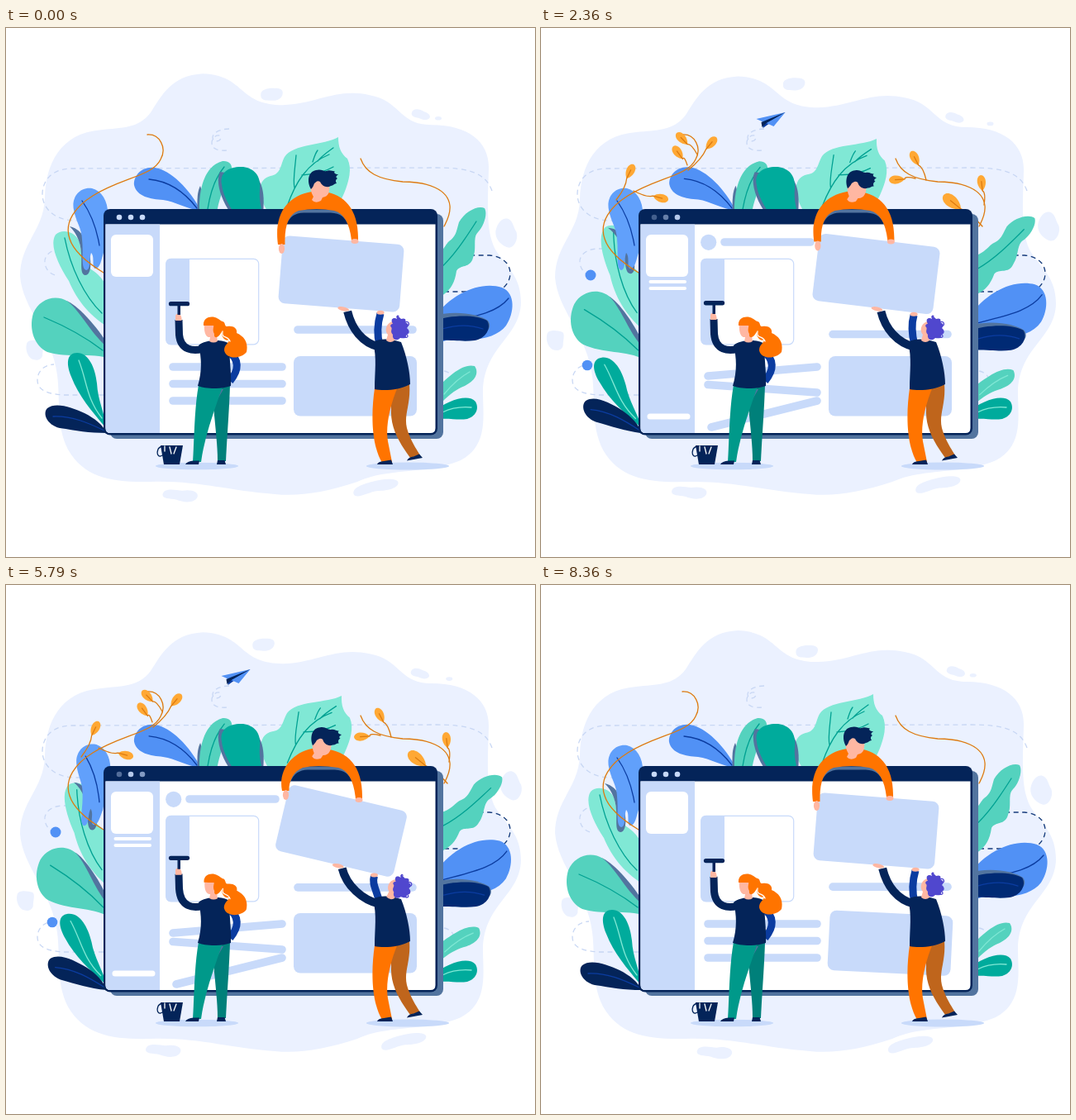
Write an HTML page that moves like this. It is 640 px wide and 640 px high and loops after 8430 ms.

```html
<!DOCTYPE html>
<html lang="en">
<head>
<meta charset="utf-8">
<title>Building a page</title>
<style>
  html, body { margin: 0; width: 100%; height: 100%; overflow: hidden; background: #fff; }
  svg { display: block; width: 100vw; height: 100vh; }
  .mist { fill: #ebf1ff; } .pale { fill: #c8dafa; } .navy { fill: #042459; } .slate { fill: #52749f; }
  .sky { fill: #5191f5; } .teal { fill: #00ab9c; } .green { fill: #54d2be; } .mint { fill: #80e8d5; }
  .orange { fill: #ff7400; } .skin { fill: #ffb7a2; } .white { fill: #fff; }
  .line { fill: none; stroke-width: 1.3; stroke-linecap: round; }
  .dash { fill: none; stroke: #c8d7f4; stroke-width: 1.3; stroke-dasharray: 6 4.5; }
  .blueVein { stroke: #0b3ca0; } .tealVein { stroke: #00a192; } .mintVein { stroke: #80e8d5; }
  .vine { stroke: #dd7b10; }
  .limb { fill: none; }
  .bar { fill: none; stroke: #c8dafa; stroke-width: 9.6; stroke-linecap: round; }
  .tag { fill: none; stroke: #fff; stroke-width: 4; stroke-linecap: round; }
</style>
</head>
<body>
<!-- data-drift: x y at the loop start, then x y half a cycle later, cycles, lag.
     data-sway: degrees, pivot x y, swings per loop. -->
<svg viewBox="0 0 640 640" preserveAspectRatio="xMidYMid meet">
  <path id="cloud" class="mist" d="M238,55C290,57 280,93 335,93C375,92 400,72 440,81C478,88 475,117 515,117C560,117 585,138 584,170C583,210 580,245 592,268C606,290 623,300 623,332C622,375 578,385 577,440C577,470 584,505 550,523C510,540 460,532 425,549C385,562 355,567 325,564C270,560 230,547 175,549C130,550 95,545 75,510C60,480 66,450 62,420C56,370 20,340 17,300C17,260 46,245 47,205C48,165 65,127 115,123C140,120 160,122 175,102C188,82 200,57 238,55Z"/>
  <g class="mist">
    <path data-drift="322 81 301 64 1 -.06" d="M-13,1C-14,-6 -4,-8 4,-7.500C12,-8 15,-4 13,1C10,8 1,8 -5,7C-10,7 -13,5 -13,1Z"/>
    <path data-drift="502 104 500 109 1 -.06" d="M-11,-2C-9,-8 -1,-6 4,-3C11,-1 13,4 9,6C3,9 -1,4 -6,4C-10,3 -12,1 -11,-2Z"/>
    <ellipse data-drift="522 109 550 118 1 -.06" rx="4" ry="2.300"/>
    <path data-drift="604 249 616 238 1 -.06" d="M-12,-3C-10,-13 -4,-19 2,-18C9,-16 9,-8 13,-2C16,7 10,18 3,17C-4,15 -13,8 -12,-3Z"/>
    <path data-drift="36 390 12 374 1 -.06" d="M-10,-8C-8,-13 2,-12 8,-10C12,-8 9,0 9,7C7,13 1,13 -4,11C-10,7 -12,-2 -10,-8Z"/>
    <path data-drift="212 566 179 562 2 .07" d="M-21,-1C-20,-10 -6,-7 3,-6C13,-8 24,-5 21,2C17,10 3,8 -4,5C-13,3 -21,4 -21,-1Z"/>
    <path data-drift="447 556 484 552 2 -.04" d="M-27,8C-29,0 -16,-4 -5,-7C8,-11 26,-12 27,-6C27,1 13,4 2,4C-9,5 -23,15 -27,8Z"/>
  </g>

  <path class="dash" d="M588,197C580,175 560,169 520,169L78,170C52,171 44,188 44,201C44,217 57,232 82,233H118"/>
  <path class="dash" d="M118,267H68C52,268 46,277 47,284C48,293 54,298 60,299"/>
  <path class="dash" d="M118,444H70C50,443 38,438 38,426C38,414 48,407 58,407"/>
  <path class="dash" d="M530,415C540,417 545,425 541,436C538,442 533,444 530,444"/>
  <path class="dash" d="M270,122C262,122 251,125 250,132C250,139 259,138 260,133C260,127 249,130 249,139C249,147 257,149 270,148"/>
  <path class="dash" style="stroke:#173d7c" d="M530,319H590C603,318 610,306 610,297C610,285 600,276 585,275H530"/>

  <circle id="dotA" class="sky" r="6.500"/>
  <circle id="dotB" class="sky" r="6.300"/>
  <circle id="dotC" class="sky" r="6.300"/>

  <g data-sway="2.6 236 220 3">
    <path class="sky" d="M236,221C222,195 200,172 180,169C163,167 154,180 155,190C158,204 175,207 190,208C205,210 218,219 236,221Z"/>
    <path class="line blueVein" d="M173,183C195,185 215,197 231,218"/>
  </g>
  <g data-sway="5 242 222 3">
    <path class="slate" d="M232,224Q230,200 235,191L245,224Z"/>
    <path class="green" d="M234,224C233,195 240,167 262,161C272,160 276,168 271,178C262,195 257,210 255,224Z"/>
    <path class="line tealVein" d="M264,168C253,181 247,200 244,219"/>
  </g>
  <g id="leafLace">
    <path class="mint" d="M318,224C303,202 304,183 320,179C333,177 332,165 337,156C347,140 385,142 402,132C402,144 405,152 413,158C419,170 415,185 409,200L398,224Z"/>
    <path class="line tealVein" d="M340,216C350,187 364,164 391,153M349,193C347,185 349,175 351,154M358,178C374,177 386,174 396,168M371,162C373,156 374,152 377,148M377,161C383,154 389,150 396,145"/>
  </g>
  <g data-sway="-1.5 288 222 3">
    <path class="slate" d="M259,174C253,185 260,208 272,224H311C313,204 311,188 303,181Z"/>
    <path class="teal" d="M261,189C258,173 272,167 287,168C300,170 309,178 307,196C306,210 309,216 310,224H276C268,212 262,200 261,189Z"/>
  </g>

  <g data-sway="10.5 119 345 2">
    <path class="mint" d="M130,366C102,350 86,330 76,306C63,286 52,262 60,250C68,242 84,246 89,259C92,279 96,288 106,294C117,302 121,310 130,330Z"/>
    <path class="line tealVein" d="M71,254C78,290 95,325 116,345"/>
  </g>
  <g id="leafAzure">
    <path data-sway="-9 90 215 2" class="slate" d="M77,240C92,243 97,258 100,270C104,283 103,299 96,299C89,298 92,285 91,272C90,258 85,248 77,240Z"/>
    <path fill="#61a0fb" d="M121,245C128,216 119,198 104,194C88,192 79,206 82,220C84,233 92,243 92,256C94,272 90,291 97,293C103,292 100,281 103,272C108,277 103,289 108,291C114,291 115,281 118,272Z"/>
    <path class="line blueVein" d="M92,209C104,226 110,245 113,263"/>
  </g>
  <g data-sway="13 119 393 1">
    <path class="slate" d="M73,330C85,334 110,360 125,386V404C105,383 85,353 73,330Z"/>
    <path class="green" d="M126,400C103,392 75,400 50,392C35,385 27,365 33,345C40,328 60,321 75,331C92,345 103,371 126,389Z"/>
    <path class="line tealVein" d="M46,350C70,360 95,373 117,390"/>
  </g>
  <g data-sway="-8.500 119 483 2">
    <path class="teal" d="M122,485C103,463 88,445 79,422C72,405 74,393 86,393C100,393 108,411 110,430C111,450 119,465 122,485Z"/>
    <path class="line mintVein" d="M88,402C98,427 97,448 116,472"/>
  </g>
  <g data-sway="8 121 489 2">
    <path class="navy" d="M122,490C100,490 85,487 65,484C49,480 44,466 50,460C60,452 80,459 95,466C107,472 117,480 122,490Z"/>
    <path class="line blueVein" d="M57,470C80,469 100,478 119,487"/>
  </g>

  <g data-sway="20 530 312 1">
    <path class="green" d="M512,335C505,305 505,283 512,280C528,274 532,261 536,258C545,252 545,245 548,235C555,222 571,214 579,218C583,225 578,240 571,247C564,254 570,266 565,278C562,291 549,286 545,294C543,308 538,316 530,322Z"/>
    <path class="line tealVein" d="M569,234C555,256 541,277 524,292"/>
  </g>
  <g data-sway="-5 525 360 1">
    <path class="sky" d="M518,350C540,320 575,306 600,314C617,321 615,345 605,360C595,373 575,378 555,376C540,374 530,378 518,384Z"/>
    <path class="line blueVein" d="M524,358C560,350 592,347 608,327"/>
  </g>
  <g id="leafInk">
    <path class="slate" d="M515,349C540,341 570,345 583,354C589,362 582,370 568,374L515,370Z"/>
    <path fill="#002a74" d="M515,355C540,346 570,347 582,354C588,363 580,376 567,378C552,380 540,377 515,378Z"/>
    <path class="line blueVein" d="M528,364C545,359 562,359 577,364"/>
  </g>
  <g data-sway="11 525 450 1">
    <path class="green" d="M515,442C535,421 553,405 567,409C573,418 567,427 555,433C545,437 538,442 528,452L515,458Z"/>
    <path class="line mintVein" d="M561,416C548,423 539,432 530,443"/>
  </g>
  <g id="leafLow">
    <path class="teal" d="M515,466C535,449 560,442 568,452C573,461 568,470 558,473C545,475 535,471 515,474Z"/>
    <path class="line mintVein" d="M528,465C540,459 552,458 563,459"/>
  </g>

  <path class="line vine" d="M171,129C186,128 195,145 187,159C178,179 140,181 105,203C84,216 70,235 77,255C82,271 100,285 118,296"/>
  <path class="line vine" d="M429,158C435,175 450,183 480,186C510,186 535,195 537,215C538,226 533,234 530,240"/>
  <g id="buds"></g>

  <rect class="slate" x="126" y="225" width="403" height="272" rx="8"/>
  <rect class="navy" x="118" y="219" width="404" height="273.500" rx="8"/>
  <path class="white" d="M120.500,237.500H519.500V484Q519.500,490 513.500,490H126.500Q120.500,490 120.500,484Z"/>
  <path class="pale" d="M120.500,237.500H186V490H126.500Q120.500,490 120.500,484Z"/>
  <g id="lights" class="pale">
    <circle cx="137" cy="229" r="3.300"/>
    <circle cx="151" cy="229" r="3.300"/>
    <circle cx="165" cy="229" r="3.300"/>
  </g>
  <rect class="white" x="127" y="250" width="51" height="51" rx="6"/>
  <path id="tagA" class="tag"/>
  <path id="tagB" class="tag"/>
  <path id="tagC" class="tag" style="stroke-width:7"/>
  <circle id="avatar" class="pale" r="9.600"/>
  <path id="title" class="bar"/>
  <rect x="193.700" y="279.300" width="112" height="103.500" rx="6" fill="#fff" stroke="#c8dafa" stroke-width="1.200"/>
  <path id="paint" class="pale"/>
  <path id="barA" class="bar"/>
  <path id="barB" class="bar"/>
  <path id="barC" class="bar"/>
  <path id="slideBar" class="bar" d="M353,365H492"/>
  <rect id="panel" class="pale" x="348" y="397" width="149" height="72.500" rx="8"/>

  <g id="plane">
    <path fill="#0b3ca0" d="M18,-9L-9,3L-9,10Z"/>
    <path class="sky" d="M18,-9L-17,-1L-8,3ZM18,-9L-5,4L4,8Z"/>
    <path class="navy" d="M18,-9L-11,3L-10,9L-5,4Z"/>
  </g>

  <g class="pale">
    <ellipse cx="231" cy="530" rx="50" ry="4.300"/>
    <ellipse cx="486" cy="530" rx="50" ry="4.500"/>
  </g>

  <path class="navy" d="M187,505H214L210,528H191Z"/>
  <path class="line" style="stroke:#042459" d="M189,506C181,508 182,519 187,518C194,515 201,511 205,506"/>
  <path class="line" style="stroke:#fff" d="M192,506V512M198,507L200,515M206,507L203,515"/>

  <path class="limb" stroke="#0b3ca0" stroke-width="9" d="M268,390C283,401 282,414 271,427"/>
  <path fill="#00807a" d="M250,434L271,432C270,465 267,500 266,524H256C256,495 250,462 250,434Z"/>
  <path class="slate" d="M252,456L256,437H263Z"/>
  <path fill="#00998a" d="M233,432L262,434C251,465 240,495 236,525H226C228,492 228,460 233,432Z"/>
  <path class="navy" d="M217,528Q219,524 227,523.500H234L233,528ZM255,528L256,523H264.500L266,528Z"/>
  <path id="painterArm" class="limb" stroke="#042459" stroke-width="9"/>
  <path class="navy" d="M233,384C241,377 262,376 270,382C270,400 273,418 272,433C258,438 240,436 232,433C237,417 237,400 233,384Z"/>
  <g id="roller">
    <path class="skin" d="M205,354V348Q206,345 209,346Q213,347 212.500,354Z"/>
    <path class="navy" d="M207.500,335H211V347H207.500ZM199.500,331H219.500A2.500,2.500 0 0 1 219.500,336.300H199.500A2.500,2.500 0 0 1 199.500,331Z"/>
  </g>
  <g id="painterHead">
    <path class="skin" d="M240,358C239,368 242,375 247,374L246,379Q251,382 256,379L255,372C261,368 260,358 257,354Z"/>
    <path class="orange" d="M239,360C238,350 249,347 257,352C261,355 262,355 262,355C266,356 264,362 268,361C276,360 280,364 279,369C290,374 293,382 291,392C284,401 266,401 264,390C264,383 270,381 270,377C265,380 260,373 261,367C257,376 251,376 252,370C249,365 252,361 251,360C247,360 242,360 239,360Z"/>
    <path class="line" stroke="#fff" d="M262,367C260,376 269,372 271,379"/>
  </g>

  <rect id="board" class="pale" x="-73.500" y="-41" width="147" height="82" rx="8"/>

  <path id="rightArm" class="limb" stroke="#0b3ca0" stroke-width="9"/>
  <path fill="#bf651c" d="M466,435L488,431C490,455 481,468 485,484C489,498 495,507 501,517L489,520C476,502 465,484 466,462Z"/>
  <path class="orange" d="M446,436L474,434C464,458 459,483 462,500L467,525L455,526C441,502 442,463 446,436Z"/>
  <path class="navy" d="M449,528Q450,524.500 457,524L466,522.500L468,528ZM485,523.500Q487,519 493,518.500L500,515.500L504,520Z"/>
  <path id="leftArm" class="limb" stroke="#042459" stroke-width="10"/>
  <path class="navy" d="M444,380C455,374 468,377 478,380C485,397 489,417 489,431C475,439 455,439 446,437C446,415 449,400 444,380Z"/>
  <ellipse id="leftHand" class="skin" rx="7" ry="2.500"/>
  <ellipse id="rightHand" class="skin" rx="4.500" ry="2.500"/>
  <g id="helperHead">
    <path class="skin" d="M467,355C459,358 458,367 462,371L460,378Q465,382 470,378L471,372L474,362Z"/>
    <path fill="#5047ce" d="M468,358C464,351 470,350 473,352C471,347 474,348 478,352C484,350 484,354 483,356C488,358 487,361 485,363C490,367 487,371 484,371C485,377 479,375 477,375C472,380 467,376 468,371C464,367 468,364 466,362C464,360 466,358 468,358Z"/>
    <path class="line" stroke="#5047ce" d="M476,353C471,349 474,347 475,349M482,356C488,354 489,359 485,361M482,370C488,371 487,376 481,374"/>
  </g>

  <path id="climberShade" fill="none" stroke="#52749f" stroke-width="4"/>
  <path id="climber" class="orange"/>
  <ellipse id="leftGrip" class="skin" rx="3.600" ry="6"/>
  <ellipse id="rightGrip" class="skin" rx="4.500" ry="3"/>
  <g id="climberHead">
    <path class="skin" d="M368,188C368,198 371,202 372,204L370,208Q374,213 381,209L383,205C391,204 392,197 391,189L379,182Z"/>
    <path class="navy" d="M369,195C364,186 365,174 375,172C382,170 384,174 388,173C392,171 396,174 398,173C396,175 398,177 402,177C400,179 398,180 401,182C398,184 399,186 400,188C397,188 396,191 393,191C388,194 382,191 380,186C376,184 375,187 373,188C372,191 371,193 369,195Z"/>
  </g>
</svg>
<script>
const LOOP = 8430;
const el = Object.fromEntries([...document.querySelectorAll('[id]')].map(n => [n.id, n]));
const numbers = text => text.split(' ').map(Number);
const collect = name => [...document.querySelectorAll(`[data-${name}]`)]
  .map(node => ({ node, args: numbers(node.dataset[name]) }));
const swaying = collect('sway'), drifting = collect('drift');

const place = (node, transform) => node.setAttribute('transform', transform);
const shift = (id, x, y, extra = '') => place(el[id], `translate(${x} ${y}) ${extra}`);
const spin = (id, deg, x, y) => place(el[id], `rotate(${deg} ${x} ${y})`);
const draw = (id, d) => el[id].setAttribute('d', d);

const mix = (a, b, k) => a + (b - a) * k;
const ease = x => { x = Math.max(0, Math.min(1, x)); return x * x * (3 - 2 * x); };
// 0 to 1 and back, n times per loop.
const swing = (t, n, lag = 0) => (1 - Math.cos(2 * Math.PI * (n * t / LOOP - lag))) / 2;
// Rises over [a, b], falls over [c, d].
const pop = (t, a, b, c, d) => ease((t - a) / (b - a)) * (1 - ease((t - c) / (d - c)));

// Stem start and tip, in the order the buds come and go.
const BUDS = [
  [189, 153, 164, 127], [453, 182, 421, 184], [534, 240, 487, 202],
  [91, 208, 112, 165], [536, 214, 532, 178], [177, 166, 160, 143],
  [178, 172, 212, 132], [112, 197, 154, 208], [466, 184, 448, 149]
];
el.buds.innerHTML = BUDS.map(([x, y, tipX, tipY]) => {
  const stem = Math.hypot(tipX - x, tipY - y), deg = Math.atan2(tipY - y, tipX - x) * 180 / Math.PI;
  const width = stem > 55 ? 9.6 : 6.8, length = stem > 55 ? 27 : 19, base = stem - length;
  return `<g><g transform="translate(${x} ${y}) rotate(${deg})">
    <path fill="#ffa834" d="M${base},0C${base + length * .3},${-width} ${stem - 1},${-width} ${stem},0C${stem - 1},${width} ${base + length * .3},${width} ${base},0Z"/>
    <path class="line vine" d="M0,0Q${stem * .4},4 ${base},0H${base + length * .6}"/></g></g>`;
}).join('');

function drawScenery(t) {
  const lean = pop(t, 3300, 4100, 5900, 6700);
  place(el.cloud, `translate(0 565) scale(1 ${1 - .009 * swing(t, 1, -.06)}) translate(0 -565)`);
  for (const { node, args: [x1, y1, x2, y2, n, lag] } of drifting) {
    const k = swing(t, n, lag);
    place(node, `translate(${mix(x1, x2, k)} ${mix(y1, y2, k)})`);
  }
  for (const { node, args: [deg, x, y, n] } of swaying) place(node, `rotate(${deg * swing(t, n)} ${x} ${y})`);
  spin('leafLace', 2.5 * pop(t, 200, 1500, 6900, 8200), 360, 225);
  spin('leafAzure', 4.5 * lean, 118, 262);
  shift('leafInk', 2.5 * swing(t, 1), 6 * pop(t, 100, 1500, 6900, 8300) + 6 * swing(t, 2));
  shift('leafLow', 0, 7 * lean);

  BUDS.forEach(([x, y], i) => {
    const start = 300 + 90 * i, end = 5700 + 190 * i;
    const size = pop(t, start, start + 900, end, end + 900);
    place(el.buds.children[i], `translate(${x} ${y}) scale(${size}) translate(${-x} ${-y})`);
  });
  shift('dotA', 60, 299, `scale(${pop(t, 500, 1300, 7000, 7900)})`);
  shift('dotB', 56, 408, `scale(${pop(t, 600, 1400, 6700, 7700)})`);
  shift('dotC', 590, 206, `scale(${pop(t, 3450, 4100, 4700, 5400)})`);

  const arrive = ease((t - 850) / 1400), leave = Math.max(0, (t - 7700) / 600) ** 2;
  shift('plane', mix(195, 277.5, arrive) + 47 * leave, mix(178, 111, arrive) - 65 * leave,
    `rotate(${-55 * (1 - arrive) - 20 * leave}) scale(${pop(t, 850, 1300, 8050, 8330)})`);
}

function drawPage(t) {
  [2, 6, 4].forEach((n, i) => el.lights.children[i].setAttribute('opacity', 1 - .7 * swing(t, n)));

  const grow = (id, x1, x2, y, k) => {
    draw(id, `M${x1},${y}H${mix(x1, x2, k)}`);
    el[id].setAttribute('visibility', k > .01 ? 'visible' : 'hidden');
  };
  grow('tagA', 132.5, 174, 307, pop(t, 300, 1000, 7100, 7900));
  grow('tagB', 132.5, 174, 315, pop(t, 450, 1150, 7000, 7800));
  grow('tagC', 132, 177, 470, pop(t, 600, 1300, 6900, 7700));
  grow('title', 222, 326, 259, pop(t, 400, 1300, 7000, 8000));
  shift('avatar', 202.7, 259.3, `scale(${pop(t, 200, 900, 7200, 8000)})`);

  const tilt = pop(t, 150, 1750, 6850, 8250);
  draw('barA', `M202,${410 + 11 * tilt}L334,410`);
  draw('barB', `M202,${430.5 + tilt}L334,${430.5 + 10.5 * tilt}`);
  draw('barC', `M${202 + 4 * tilt},${451 + 32 * tilt}L334,451`);
  shift('slideBar', 0, 24 * swing(t, 3));
  spin('panel', 2.8 * ease((t - 7750) / 600), 422.5, 433);
}

function drawPainter(t) {
  const reach = -6.5 * swing(t, 4);
  shift('roller', 0, reach);
  draw('painterArm', `M246,386C224,394 211,388 209.5,${371 + reach}L209,${353 + reach}`);
  draw('paint', `M199.500,279H222V${334 + reach}H209V383H199.500Q193.500,383 193.500,377V285Q193.500,279 199.500,279Z`);
  spin('painterHead', 1.5 * pop(t, 3300, 4100, 5900, 6700), 250, 379);
}

function drawBoardCrew(t) {
  const deg = 4.5 + 2.7 * pop(t, 0, 3000, 6500, 8400) + 6.1 * pop(t, 3200, 4200, 5800, 7900);
  const a = deg * Math.PI / 180, cx = 405.5, cy = 297.5;
  const onBoard = (x, y) => [cx + x * Math.cos(a) - y * Math.sin(a), cy + x * Math.sin(a) + y * Math.cos(a)];
  shift('board', cx, cy, `rotate(${deg})`);

  const [lx, ly] = onBoard(6, 42), [rx, ry] = onBoard(50, 42);
  draw('leftArm', `M452,386C431,381 ${lx + 10},${ly + 24} ${lx + 5},${ly + 3}`);
  draw('rightArm', `M452,384C448,368 ${rx - 2},${ry + 12} ${rx + 1},${ry + 2}`);
  shift('leftHand', lx, ly, 'rotate(12)');
  shift('rightHand', rx + 1, ry + 1);
  spin('helperHead', 10 * pop(t, 5000, 5600, 6000, 6700), 464, 379);

  const lift = (deg - 4.5) / 8.8, x = v => v + 5 * lift;
  const left = 262 - 13 * lift, right = 257 + 2 * lift;
  draw('climber', `M${x(329)},${left}C${x(324)},225 ${x(340)},203 370,198Q376,196 384,198C${x(410)},201 ${x(427)},220 ${x(426)},${right}`
    + `H${x(418)}C${x(416)},237 ${x(409)},224 ${x(397)},221Q376,217 ${x(354)},221C${x(341)},226 ${x(337)},240 ${x(337.5)},${left}Z`);
  draw('climberShade', `M${x(337)},238C${x(342)},226 ${x(349)},222 ${x(360)},221.5H${x(393)}C${x(406)},222 ${x(412)},228 ${x(416)},238`);
  shift('leftGrip', x(333.5), left + 5);
  shift('rightGrip', x(422), right + 1);
  spin('climberHead', 8 * (pop(t, 700, 1500, 2500, 3150) + pop(t, 3400, 4100, 6800, 8200)), 376, 209);
}

function render(t) {
  drawScenery(t);
  drawPage(t);
  drawPainter(t);
  drawBoardCrew(t);
}

const began = performance.now();
function tick() {
  render((performance.now() - began) % LOOP);
  requestAnimationFrame(tick);
}
tick();
</script>
</body>
</html>
```
